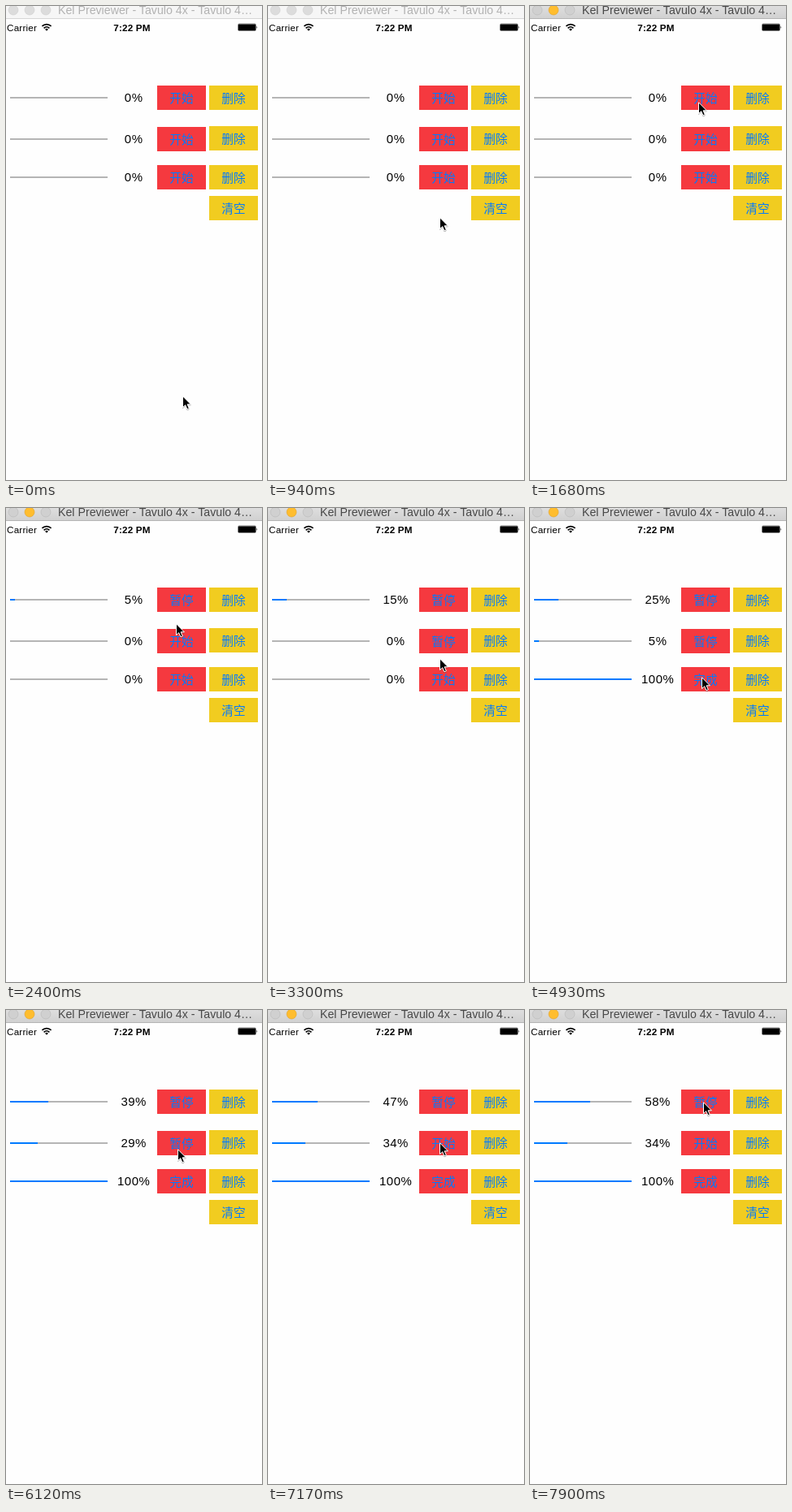
Write an HTML page that moves like this. It is 315 px wide and 584 px high and loops after 8000 ms.

```html
<!DOCTYPE html>
<html lang="zh">
<head>
<meta charset="utf-8">
<title>Download list</title>
<style>
  html, body { margin: 0; width: 100%; height: 100%; overflow: hidden; background: #fefefe; }
  svg { display: block; width: 100%; height: 100%; }
  text { font-family: "Liberation Sans", sans-serif; }
  .button { font: 300 14.7px "Noto Sans CJK SC", "Noto Sans CJK", sans-serif; fill: #007aff; text-anchor: middle; }
  .percent { font-size: 15px; letter-spacing: 0.5px; text-anchor: middle; }
  .status { font-size: 11.7px; letter-spacing: 0.2px; }
</style>
</head>
<body>
<svg id="stage" viewBox="0 0 315 584">
  <defs>
    <linearGradient id="chrome" x2="0" y2="1">
      <stop stop-color="#dedede"/><stop offset="1" stop-color="#d0d0d0"/>
    </linearGradient>
    <filter id="shadow" x="-50%" y="-50%" width="200%" height="200%">
      <feDropShadow dx="0" dy="1" stdDeviation="0.7" flood-opacity="0.4"/>
    </filter>
  </defs>
  <rect width="315" height="584" fill="#fefefe"/>
  <rect id="bar" width="315" height="16"/>
  <rect id="edge" y="15" width="315" height="1"/>
  <g id="lights" stroke-width="0.6">
    <circle cx="9" cy="5" r="6"/><circle cx="29" cy="5" r="6"/><circle cx="49" cy="5" r="6"/>
  </g>
  <text id="title" x="64" y="10" font-size="14.2">Kel Previewer - Tavulo 4x - Tavulo 4…</text>

  <text class="status" x="1" y="30.5">Carrier</text>
  <g fill="none" stroke="#000" stroke-width="1.7">
    <path d="M44.4 24.9a8 8 0 0 1 11.2 0M46.6 27.3a4.9 4.9 0 0 1 6.8 0"/>
    <path d="M50 30.8l-1.9-2a2.7 2.7 0 0 1 3.8 0z" fill="#000" stroke="none"/>
  </g>
  <text class="status" x="155" y="30.5" font-weight="bold" text-anchor="middle">7:22 PM</text>
  <rect x="285.5" y="22" width="22" height="8.5" rx="1.5" fill="none" stroke="#000" stroke-width="0.5"/>
  <rect x="286" y="22.5" width="21" height="7.5" rx="0.5"/>
  <path d="M308.5 24.5q1.5 1.7 0 3.4z"/>

  <g id="rows"></g>
  <g id="cursor" filter="url(#shadow)">
    <path d="M0.5 0.8V14.6L3.7 11.7L6 16.8L8.3 15.8L6.1 10.8H10.4Z" stroke="#fff"/>
  </g>
</svg>
<script>
const LOOP = 8000, FIRST_STEP = 480, STEP = 148;
const BLUE = '#007aff', RED = '#f5393f', YELLOW = '#f1cc20';
const $ = id => document.getElementById(id);

function add(tag, attrs, text = '') {
  const el = document.createElementNS('http://www.w3.org/2000/svg', tag);
  for (const name in attrs) el.setAttribute(name, attrs[name]);
  el.textContent = text;
  $('rows').append(el);
  return el;
}

function addButton(x, y, fill, label) {
  add('rect', { x, y, width: 60, height: 30, fill });
  return add('text', { class: 'button', x: x + 30, y: y + 20.5 }, label);
}

// Keys are [step, value]; captions switch at their step, progress is interpolated.
const rows = [
  { y: 98, deleteY: 98,
    progress: [[9, 0], [15, 10], [19, 15], [23, 20], [27, 20], [30, 25], [34, 33], [38, 39], [42, 40.4], [45, 47], [50, 57.8]],
    captions: [[-1, '开始'], [9, '暂停']] },
  { y: 149, deleteY: 148,
    progress: [[27, 0], [30, 5], [34, 18], [38, 28.6], [40, 34]],
    captions: [[-1, '开始'], [16, '暂停'], [41, '开始']] },
  { y: 196, deleteY: 196,
    progress: [[23, 0], [26, 100]],
    captions: [[-1, '开始'], [23, '暂停'], [26, '完成']] },
];
const cursorX = [[-1, 217], [6, 207], [10, 207], [14, 211], [46, 211], [50, 213]];
const cursorY = [[-1, 480], [6, 118], [10, 118], [14, 165], [17, 165], [19, 185], [22, 208],
  [34, 208], [38, 171], [40, 165], [42, 165], [45, 163], [46, 163], [50, 113]];

for (const row of rows) {
  const lineY = row.y + 14;
  add('rect', { x: 5, y: lineY, width: 120, height: 2, fill: '#b5b5b5' });
  row.fill = add('rect', { x: 5, y: lineY, width: 0, height: 2, fill: BLUE });
  row.percent = add('text', { class: 'percent', x: 157.2, y: row.y + 20 });
  row.caption = addButton(186, row.y, RED, '');
  addButton(250, row.deleteY, YELLOW, '删除');
}
addButton(250, 234, YELLOW, '清空');

function valueAt(keys, step, ease = u => u) {
  const next = keys.findIndex(key => key[0] > step);
  if (next === 0) return keys[0][1];
  if (next < 0) return keys[keys.length - 1][1];
  const [s0, v0] = keys[next - 1], [s1, v1] = keys[next];
  return v0 + (v1 - v0) * ease((step - s0) / (s1 - s0));
}

const smooth = u => u * u * (3 - 2 * u);

function drawWindow(active) {
  $('bar').setAttribute('fill', active ? 'url(#chrome)' : '#f6f6f6');
  $('edge').setAttribute('fill', active ? '#b4b4b4' : '#d6d6d6');
  $('title').setAttribute('fill', active ? '#484848' : '#b2b2b2');
  [...$('lights').children].forEach((light, i) => {
    const lit = active && i === 1;
    light.setAttribute('fill', lit ? '#ffbd2e' : active ? '#d0d0d0' : '#dcdcdc');
    light.setAttribute('stroke', lit ? '#e0a028' : active ? '#b8b8b8' : '#cfcfcf');
  });
}

function draw(now) {
  const step = Math.floor((now % LOOP - FIRST_STEP) / STEP);
  drawWindow(step >= 8);
  for (const row of rows) {
    const progress = valueAt(row.progress, step);
    row.fill.setAttribute('width', Math.round(progress * 1.2));
    row.percent.textContent = Math.round(progress) + '%';
    row.caption.textContent = row.captions.filter(key => key[0] <= Math.max(step, -1)).pop()[1];
  }
  const x = valueAt(cursorX, step, smooth), y = valueAt(cursorY, step, smooth);
  $('cursor').setAttribute('transform', `translate(${Math.round(x)} ${Math.round(y)})`);
  requestAnimationFrame(draw);
}
draw(performance.now());
</script>
</body>
</html>
```
